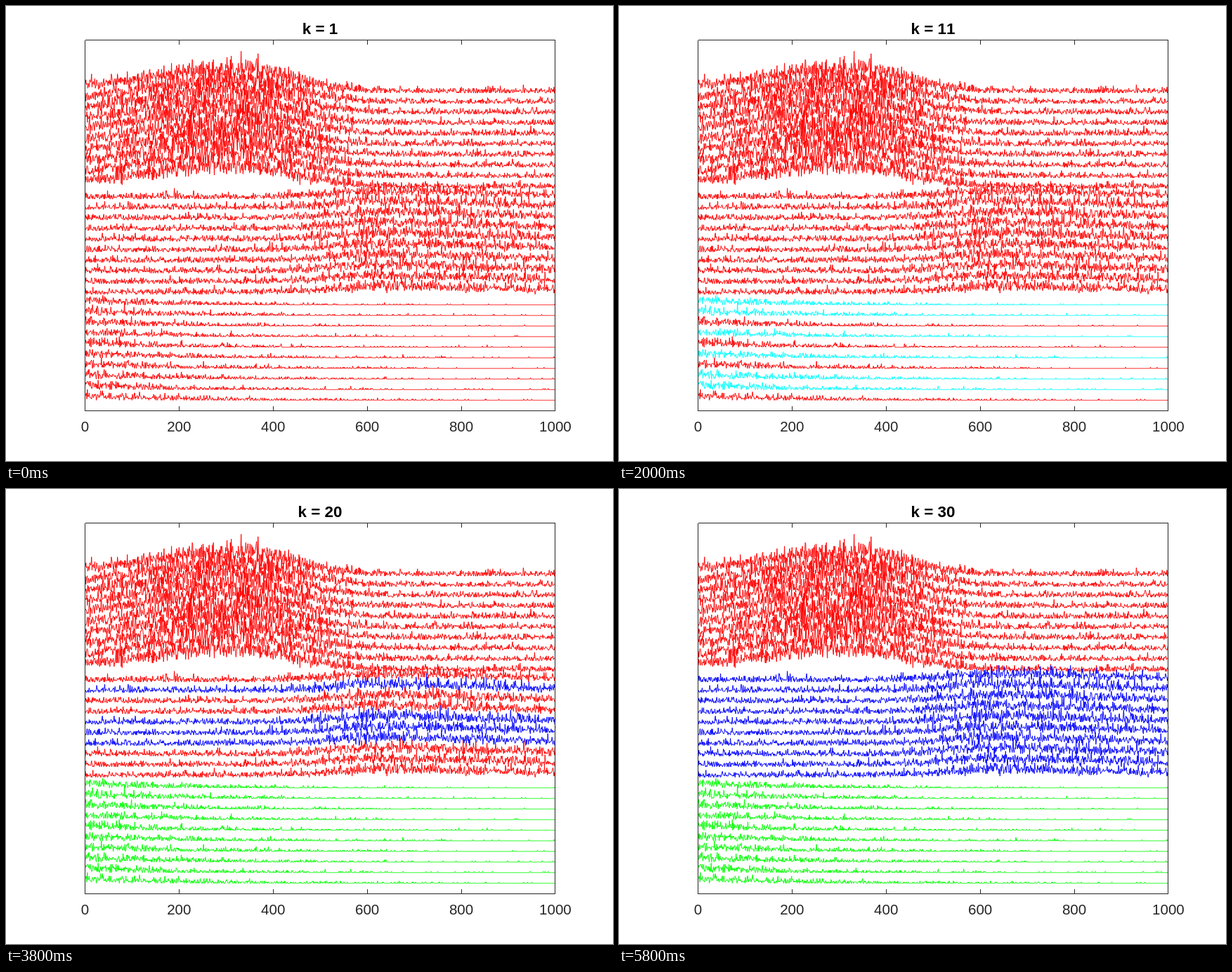
Write an HTML page that moves like this. It is 864 by 648 pixels and loops after 6000 ms.

```html
<!DOCTYPE html>
<html lang="en">
<head>
<meta charset="utf-8">
<title>Clustering of 30 series</title>
<style>
html, body { margin: 0; width: 100%; height: 100%; overflow: hidden; background: #fff; }
svg { display: block; width: 864px; height: 648px; }
text { font-family: "Liberation Sans", Arial, sans-serif; font-kerning: none; text-anchor: middle; }
#title { font-size: 22.4px; font-weight: bold; fill: #000; }
#labels { font-size: 20.5px; fill: #262626; }
#axes { fill: none; stroke: #262626; shape-rendering: crispEdges; }
#rows { fill: none; stroke-width: 0.95; stroke-linejoin: round; }
</style>
</head>
<body>
<svg viewBox="0 0 864 648">
  <g id="rows"></g>
  <path id="axes" d="M113 48.5H781.5V576.5H112.5V48.5"/>
  <g id="labels"></g>
  <text id="title" x="447" y="40"></text>
</svg>
<script>
const LEFT = 112.4, WIDTH = 669.5, TOP = 48.5, BOTTOM = 576.5;
const ROWS = 30, SAMPLES = 1000, STEPS = 30, STEP_MS = 200;
const GAP = (BOTTOM - TOP) / 35;
const UNIT = 1.7; // height of one count in pixels
const $ = id => document.getElementById(id);

// Rows in the order they join a cluster, and how many have joined by step k
const order = [28, 29, 22, 24, 21, 26, 25, 27, 30, 17, 23, 16, 15, 12, 14, 13, 18, 19, 20, 11];
const joined = [[1, 0], [7, 4], [11, 6], [15, 10], [20, 14], [25, 19], [30, 20]];

function countAt(k) {
  const n = Math.max(1, joined.findIndex(p => p[0] >= k));
  const [k0, c0] = joined[n - 1], [k1, c1] = joined[n];
  return Math.floor(c0 + (c1 - c0) * (k - k0) / (k1 - k0));
}

let seed = 20177;
function random() {
  seed = (seed + 0x6D2B79F5) | 0;
  let t = Math.imul(seed ^ (seed >>> 15), 1 | seed);
  t = (t + Math.imul(t ^ (t >>> 7), 61 | t)) ^ t;
  return ((t ^ (t >>> 14)) >>> 0) / 4294967296;
}

function poisson(mean) {
  const limit = Math.exp(-mean);
  let count = 0;
  for (let p = random(); p > limit; p *= random()) count++;
  return count;
}

// Bell curve with its own width on each side of the peak
const bell = (i, peak, rise, fall) => Math.exp(-(((i - peak) / (i < peak ? rise : fall)) ** 2));

// Mean height of a row above its baseline
function level(row, i) {
  if (row <= 10) return 3.2 + 32 * bell(i, 320, 270, 165);
  if (row <= 20) return 3.5 + 9 * bell(i, 620, 130, 340);
  return 7.5 * Math.exp(-i / 190);
}

const toX = i => LEFT + WIDTH * i / SAMPLES;

function make(tag, parent, attrs) {
  const node = document.createElementNS("http://www.w3.org/2000/svg", tag);
  for (const name in attrs) node.setAttribute(name, attrs[name]);
  return parent.appendChild(node);
}

function makeRow(row) {
  const base = BOTTOM - GAP * (ROWS + 1 - row);
  const points = [];
  for (let i = 1; i <= SAMPLES; i++) {
    const y = base - UNIT * poisson(level(row, i) / UNIT);
    points.push(toX(i).toFixed(2) + " " + y.toFixed(2));
  }
  return make("path", $("rows"), { d: "M" + points.join("L") });
}

const lines = Array.from({ length: ROWS }, (_, n) => makeRow(n + 1));

let ticks = "";
for (let v = 0; v <= SAMPLES; v += 200) {
  const x = Math.floor(toX(v)) + 0.5;
  ticks += `M${x} ${TOP}v6.5M${x} ${BOTTOM}v-6.5`;
  make("text", $("labels"), { x: toX(v), y: 606 }).textContent = v;
}
$("axes").setAttribute("d", $("axes").getAttribute("d") + ticks);

let shown = 0;
function show(k) {
  if (k === shown) return;
  shown = k;
  const members = order.slice(0, countAt(k));
  const early = members.every(row => row > 20);
  $("title").textContent = "k = " + k;
  lines.forEach((line, n) => {
    const row = n + 1;
    const color = !members.includes(row) ? "#f00" : row <= 20 ? "#00f" : early ? "#0ff" : "#0f0";
    line.setAttribute("stroke", color);
  });
}

const start = performance.now();
function tick() {
  const time = Math.max(0, performance.now() - start);
  show(Math.floor(time / STEP_MS) % STEPS + 1);
  requestAnimationFrame(tick);
}
tick();
</script>
</body>
</html>
```
